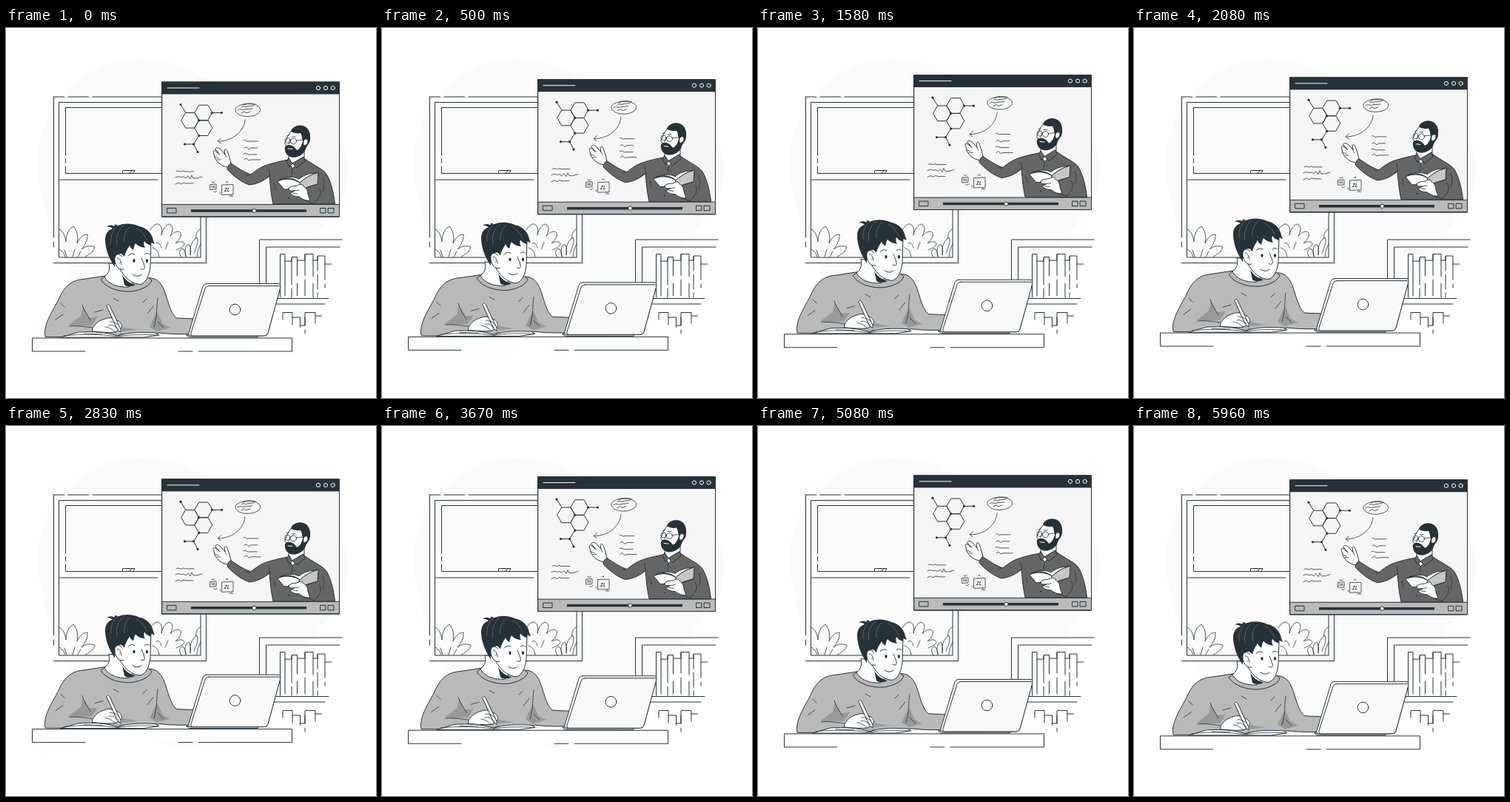
Animation of 500x500 px, one loop 6 s. Source, as an HTML page:

```html
<!DOCTYPE html>
<html lang="en">
<head>
<meta charset="utf-8">
<title>Online lesson</title>
<style>
  html, body { margin: 0; width: 100%; height: 100%; overflow: hidden; background: #fff; }
  svg { display: block; width: 100vw; height: 100vh; }
  svg * { stroke-linecap: round; stroke-linejoin: round; }
  .l { fill: none; stroke: #263238; stroke-width: 1; }
  .thin { stroke-width: .8; }
  .w { fill: #fff; stroke: #263238; }
  .d { fill: #263238; }
  .o { fill: none; stroke: #fff; }
  .shade { fill: #999; }
</style>
</head>
<body>
<svg viewBox="0 0 500 500">
  <path fill="#fafafa" d="M180 42C235 40 272 72 320 92C390 112 462 125 462 190C464 250 410 275 385 330C360 395 305 433 240 432C165 430 118 395 92 342C70 295 43 235 43 180C44 105 105 44 180 42Z"/>

  <!-- room window -->
  <g class="l">
    <path d="M64.5 93H79M84 93H112M117 93H215M64.5 93V283M64.5 289V296M64.5 317.5H270.5V240M215 100.5H71.5V310H263V240"/>
    <path d="M215 107.5H80.5V172M80.5 177V182M80.5 187V196.5H215M71.5 205H205M157.5 196V192.5H174L172 196M167 196L170 193"/>
    <path class="thin" d="M72 272C77 274 80 281 81 289C81 279 85 271 91 268C96 273 98 282 96 291C99 284 104 279 110 279C111 286 107 293 102 299C108 294 115 294 120 296C119 302 113 306 107 309M72 299C76 301 79 305 80 309M79 300L82 309M93 299L90 309M101 302L97 309"/>
    <path class="thin" d="M195 273C198 268 202 264 206 265C211 267 211 274 210 280C212 272 215 266 221 265C227 267 225 275 222 281C226 276 233 273 236 277C238 282 233 287 229 291C234 288 240 288 241 292C240 296 234 298 230 300M203 291C206 289 209 292 210 297M219 290L215 299M237 310C233 304 234 299 239 298C242 301 243 305 243 309C241 301 242 294 247 292C250 296 250 302 249 307C248 298 250 288 258 283C261 289 257 297 254 304M263 271C257 275 256 280 257 284M263 292C260 298 258 304 258 309M198 297C203 298 206 303 207 309"/>
  </g>

  <!-- bookshelf -->
  <path class="l" d="M454 286H342.5V350M451 296H351.5V350M360 365.5H436M360 373H431M370.5 364V305.5H377V362M377 315H386V309.5H393.5V335M386 311V347M386 352V364M393.5 345V362M393.5 314H404V305.5H415V336M404 306V334M404 340V362M415 345V364M415 314H421V308H431V340M421 309V328M421 333V353M421 358V364M431 346V351M431 319H439.5"/>
  <path class="l" d="M374 394V384.5H387V401M387 391H397.5V404M397.5 402H404V384.5H418V399M404 391V402M404 408V413M418 389H426.5"/>

  <!-- video lesson -->
  <g id="video">
    <rect x="211" y="73" width="239.5" height="182" fill="#f5f5f5" class="w" style="fill:#f5f5f5"/>
    <rect class="d" x="211" y="73" width="239.5" height="16.5"/>
    <path class="o" d="M218 81H261"/>
    <g class="o"><circle cx="422" cy="81" r="2.6"/><circle cx="432" cy="81" r="2.6"/><circle cx="441.7" cy="81" r="2.6"/></g>

    <g class="l" id="molecule">
      <path d="M278.5 114.5H291.5M242.5 114L236 103.5M260.8 145.5L253.5 157H241.5M253.5 157L259 167.5"/>
    </g>
    <g class="d" id="atoms"></g>

    <g class="l thin">
      <path d="M337 103C326 100 313 104 310 109C309 116 318 120 328 119.500C338 119 345 114 343.500 109C341 103 329 101 320 104M318 107C321 104 323 108 326 106L335 105M313 111C317 108 319 112 323 110L333 109M318 115L322 113L325 115L330 113"/>
      <path d="M323 124C322 139 307 153 287 153M290.500 149L286 153L290 156"/>
      <path d="M321 152C323 150 325 155 328 153H341M322 162L325 161L328 164L331 162H340M321 170C324 168 326 172 329 171H339M322 178L325 176L328 179L331 178H344"/>
      <path d="M230 194C233 191 235 196 239 193L242 194H254M229 202C233 199 236 203 240 201L243 203L246 200L249 204L251 199L253 203H258L265 201M229 211L233 209L236 211L240 209L243 210H253"/>
      <path d="M276 211.500L284 211V218L276 218.500ZM278 216V213M280 216V214L281 213L282 216M278 208L280 209L282 208M281 221L283 222L285 220"/>
      <path d="M292 212L307 211.500V225L292 225.500ZM297 209L299 207L300 209M302 228L304 226L305 228L307 227M289 222L290 224"/>
    </g>
    <text x="295" y="221" font-family="'Open Sans', sans-serif" font-size="7" font-style="italic" font-weight="600" fill="#263238">ZL</text>

    <!-- teacher -->
    <path class="w" d="M299 188C292 187 285 182 282 175L281 170C279 166 281 164 284 167L289 171L283 164C283 161 287 161 290 164L296 171L295 165C297 162 299 165 300 169C302 174 303 179 304 183Z"/>
    <path class="l thin" d="M282 174L287 176M285 178L290 178M296 171L298 175"/>
    <path class="l" style="fill:#666" d="M382 178C370 180 358 183 350 186C342 189 336 194 331 198C321 195 312 188 304 183C301 184 299 188 299 191C307 200 319 209 329 212C340 211 349 206 356 200C357 212 358 225 361 238H444.500C443 225 440 210 434 199C430 191 418 187 404 177Z"/>
    <path class="w" d="M384 166L381 179L387 190L403 176L403 160Z"/>
    <path class="l" style="fill:#666" d="M382 176L379 180L383 188L387 183L393 189L404 180L402 174L387 183Z"/>
    <path class="w" d="M386 139C382 143 380 148 379 151L376.500 156L379 159C379 166 383 171 390 170L403 162L407 150L400 137Z"/>
    <path class="d" d="M385 140C386 134 394 130 401 132C409 134 412 142 411 150C411 156 407 158 405 163C404 168 399 173 392 174.500C384 176 378 172 377 165C376 161 378 158 382 158C387 158 390 161 393 165C397 164 400 158 401 153C400 149 400 145 398 142C394 143 389 142 385 140Z"/>
    <path class="w" d="M402 153C403 149 408 149 408 153C408 157 404 160 402 158Z"/>
    <path d="M381 163L387 163.500" stroke="#fff"/>
    <g class="l thin"><circle cx="380.5" cy="152" r="3.600"/><circle cx="388.500" cy="153" r="4"/><path d="M392 152L402 151M379 146L382 145M386 147L391 147M384 151L382 157"/></g>
    <path class="l thin" d="M387 190L386 200M357 201L355 190M352 203L356 199M423 216C428 221 425 229 416 237M404 233L417 237M428 203C431 210 430 217 428 221M362 210L364 218M329 199L325 198"/>
    <circle class="d" cx="382" cy="230" r="1"/><circle class="d" cx="390" cy="196" r=".8"/>
    <path class="w" d="M367 207L373 205C382 203 390 205 397 209C403 203 412 198 422 195L421 211C413 214 405 216 397 219C389 217 381 218 376 218Z"/>
    <path style="fill:#c7c7c7" class="l" d="M397 209C403 203 412 198 422 195L421 211C413 213 404 216 397 219Z"/>
    <path class="w" d="M370 205C380 201 390 203 397 209C405 202 412 198 420 196C410 196 402 199 396 204C388 200 378 201 370 205Z"/>
    <path class="w" d="M382 217C384 213 390 214 394 213C398 210 401 211 402 214C406 216 408 220 408 225L411 233C405 234 400 231 396 228C390 228 386 226 384 223L390 220C386 220 382 221 382 217Z"/>
    <path class="l thin" d="M390 220L396 219M387 223L394 224"/>

    <!-- player bar -->
    <rect class="w" style="fill:#bababa" x="211" y="238.500" width="239.500" height="16.500"/>
    <path d="M250 247H406" stroke="#263238" stroke-width="3.500" style="stroke-linecap:butt"/>
    <circle class="w" cx="335.500" cy="247" r="2.700"/>
    <path class="l" d="M218 243.500H230V250H218ZM425 243.500H432V250H425ZM435.500 243.500H443V250H435.500Z"/>
    <rect class="l" x="211" y="73" width="239.500" height="182"/>
  </g>

  <!-- student at the desk -->
  <g id="student">
    <path class="l" style="fill:#b9b9b9" d="M53 417C50 403 60 387 70 369C77 352 86 341 104 339.500L134 335L197 338C208 340 213 350 217 364C221 377 225 389 231 392L256 393V413C240 414 225 414 207 412L155 418Z"/>
    <path class="shade" d="M84 402L101 389L104 376L112 391L124 390L116 402L95 403ZM194 404L204 383L212 400L222 405L204 410ZM157 404L178 408L156 410Z"/>
    <path class="l thin" d="M103 374C105 382 110 387 114 395M120 384L131 381M86 403C94 402 103 403 117 405M77 387L67 394M205 365C203 377 205 388 200 404M199 376L191 386M190 366L185 371M205 397L213 405M74 372L79 377M152 369L145 365"/>
    <path class="l" style="fill:#b9b9b9" d="M134 335L128 340C136 352 153 357 170 356C184 354 195 348 197 341L192 337Z"/>
    <path class="w" d="M139 318C141 326 139 332 133 336C138 346 151 351 166 350L172 342L158 320Z"/>
    <path class="d" d="M157 333C160 340 167 345 175 347C170 350 163 350 160 347Z"/>
    <path class="w" d="M148 300C147 312 152 325 158 332C163 340 173 346 181 346.500C188 346 194 335 195 322L196 289L175 282Z"/>
    <path class="d" d="M147 323C140 313 134 299 134 286C134 278 138 273 144 271C142 269 139 268 136 269C139 266 143 266 146 268L148 265L151 267C161 263 172 264 180 268C191 270 198 279 199 287L201 292L196 290L196 294C192 293 189 291 187 288C186 291 186 294 188 297C181 296 178 294 175 291C173 294 173 297 172 300C169 298 168 296 167 294C164 299 161 303 160 309L156 305C151 305 147 308 147 313Z"/>
    <path class="l" style="stroke:#78848a;stroke-width:.6" d="M151 267C144 273 141 281 142 290M159 267C151 273 148 283 150 293M168 268C161 273 159 282 160 289M176 270C183 274 188 281 190 286"/>
    <path class="w" d="M157 309C152 303 146 306 147 314C148 322 153 328 159 326"/>
    <path class="l thin" d="M150 311C153 310 156 315 156 320M153 318L155 316"/>
    <g class="d"><ellipse cx="173" cy="314.500" rx="1.600" ry="2.400"/><ellipse cx="190.500" cy="314.500" rx="1.600" ry="2.400"/></g>
    <path class="l" d="M165 308C167 305 171 304 174 306M187 306C189 304 192 304 194 306M183 311C185 316 188 322 187 325C185 327 183 326 182 325M171 333C175 336 180 336 183 333"/>

    <!-- desk -->
    <path fill="#fff" d="M35.500 419H386.500V437H35.500Z"/>
    <path class="l" d="M107 437H35.500V419H386.500V437H260M233 437H252"/>

    <!-- notebook and writing hand -->
    <path class="w" d="M74 418L98 411C116 410 136 411 151 416C165 411 184 411 202 412L207 415L186 418Z"/>
    <path class="l thin" d="M78 416C105 413 130 414 151 417C166 414 188 414 204 415M105 413L130 414M151 416L157 413"/>
    <path class="w" d="M117 406C121 398 127 395 134 393C140 390 147 393 152 396C156 398 158 403 155 407L148 411C138 412 127 411 117 410Z"/>
    <path class="w" d="M136 375C137 373 139 373 140 375L155 407V411L151 408Z"/>
    <path class="l thin" d="M140 397C145 396 149 399 153 402M139 402C144 400 148 404 152 407M134 404C139 404 143 407 148 411"/>

    <!-- laptop -->
    <path class="w" style="fill:#d5d5d5" d="M244 415L341 415L340 418H248Z"/>
    <path class="w" d="M271 345.500H368Q371.500 345.500 371 349L354 412Q353 416 349 416H250Q246 416 247 412L266 349Q267 345.500 271 345.500Z"/>
    <path class="w" style="fill:#f8f8f8" d="M274 348.500H368Q371.500 348.500 370.500 352L354 412Q353 416 349 416H253Q249 416 250 412L269 352Q270 348.500 274 348.500Z"/>
    <circle class="w" cx="309.500" cy="380.500" r="7.300"/>
  </g>
</svg>
<script>
  const el = id => document.getElementById(id);
  const svgNode = (parent, tag, attrs) => {
    const node = document.createElementNS('http://www.w3.org/2000/svg', tag);
    for (const key in attrs) node.setAttribute(key, attrs[key]);
    parent.append(node);
  };

  const hexagon = (cx, cy, r) => Array.from({ length: 6 }, (_, i) =>
    [cx + r * Math.cos(i * Math.PI / 3), cy + r * Math.sin(i * Math.PI / 3)]).join(' ');
  for (const [x, y] of [[266.7, 114.5], [248.6, 124.8], [266.7, 135.2]])
    svgNode(el('molecule'), 'polygon', { points: hexagon(x, y, 11.9) });
  for (const [cx, cy] of [[278.5, 114.5], [291.5, 114.5], [236, 103.5], [260.6, 124.8],
    [260.8, 145.5], [253.5, 157], [241.5, 157], [259, 167.5]])
    svgNode(el('atoms'), 'circle', { cx, cy, r: 1.6 });

  // Linear rise and fall by 10 px within one period
  const lift = (t, period) => -10 * (1 - Math.abs(1 - 2 * (t % period) / period));

  function draw() {
    const t = performance.now();
    el('video').setAttribute('transform', `translate(0 ${lift(t, 3000)})`);
    el('student').setAttribute('transform', `translate(0 ${lift(t, 6000)})`);
    requestAnimationFrame(draw);
  }
  draw();
</script>
</body>
</html>
```
